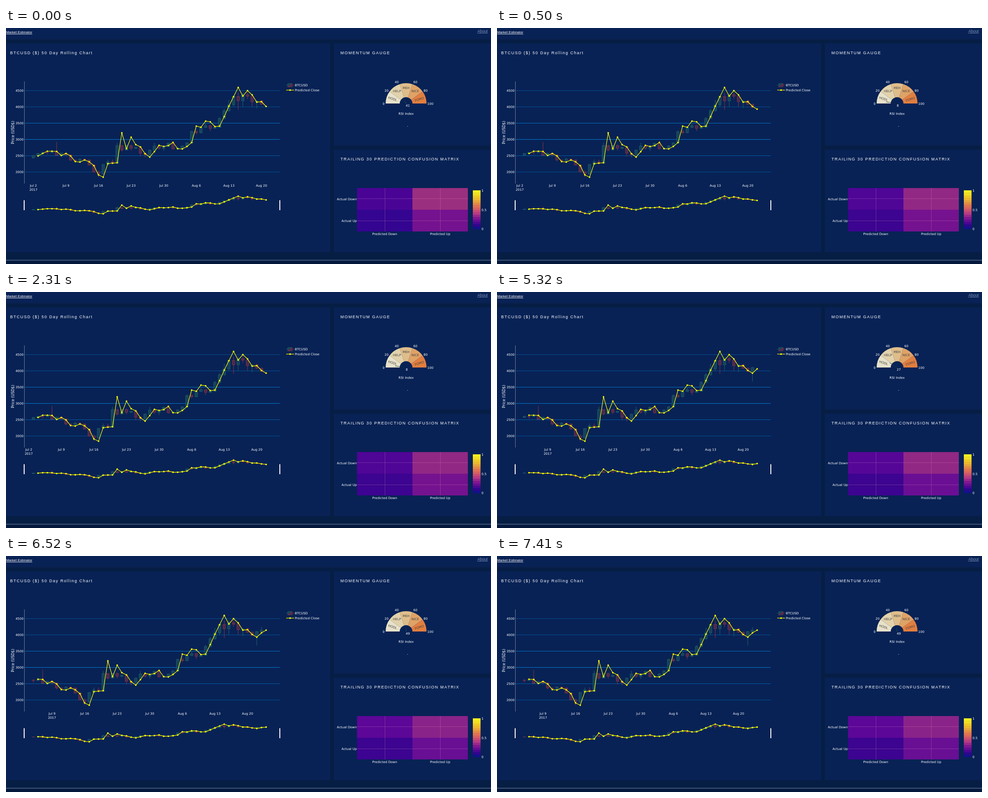
Recreate the animation shown at these times as an HTML page with a canvas. Size 1068 by 522 pixels, loop 8 s.

```html
<!DOCTYPE html>
<html lang="en">
<head>
<meta charset="utf-8">
<title>Rolling price dashboard</title>
<style>
html, body { margin: 0; width: 100%; height: 100%; overflow: hidden; background: #061e44; }
canvas { display: block; }
</style>
</head>
<body>
<canvas id="stage" width="1068" height="522"></canvas>
<script>
const ctx = document.getElementById('stage').getContext('2d');
const LOOP = 8000;
const SANS = '"Liberation Sans", Arial, sans-serif';
const PLOT = '"DejaVu Sans", Verdana, sans-serif';
const PANEL = '#082255';
const FIRST_X = 60.3, DAY = 10.25;

// One entry per step of the rolling window
const STEPS = [
  { at: 0, rsi: 41, matrix: ['#4a0495', '#9b2f7f', '#340590', '#75128f'] },
  { at: 500, rsi: 8, matrix: ['#4f0596', '#912884', '#3c0490', '#75128f'] },
  { at: 3520, rsi: 27, matrix: ['#560697', '#912884', '#3c0490', '#6a0f94'] },
  { at: 6520, rsi: 49, matrix: ['#5c0797', '#8a2389', '#3c0490', '#680f94'] }
];

// Heights on the chart, one per day; predictions begin on the second day
const predicted = [
  283, 277.5, 272.5, 272.5, 273, 282, 277.5, 283, 295.5, 296.5, 292, 296, 304.5,
  325, 330, 300, 299, 298, 232, 267, 241.5, 258, 263, 278, 285.5, 273.5, 259.5,
  262, 260, 253, 267, 267.5, 262, 253.5, 217, 219.5, 206, 207.5, 218, 217, 196,
  173, 152, 131.5, 150.5, 138.5, 148, 164, 163, 173.5, 179.5, 170, 164
];
const closes = [
  282, 277.5, 275, 275.5, 273, 281.5, 277, 281, 292, 294, 290, 292, 303, 318.5,
  323, 302, 296, 299, 260, 270, 260, 266, 264, 277, 280, 270, 261, 266, 262, 255,
  267, 265.5, 261, 254, 229, 231.5, 220, 216, 222, 219.5, 200, 183, 170, 151.5,
  161, 147.5, 151, 163, 161, 168.5, 175.5, 167, 164
];
const highs = {
  0: 281, 3: 272, 5: 252, 10: 288, 14: 315, 16: 291, 17: 291, 18: 254, 21: 258,
  26: 254, 34: 227, 35: 225, 37: 212, 40: 197, 41: 179, 42: 159, 44: 143, 45: 143,
  46: 142, 47: 148, 51: 166, 52: 157
};
const lows = {
  0: 289, 3: 280, 8: 294.5, 9: 297, 14: 330, 17: 301, 19: 273, 21: 271, 22: 268,
  23: 284, 24: 286, 27: 269, 28: 272, 30: 269, 35: 235, 36: 233, 38: 228,
  41: 202, 42: 185, 43: 175, 44: 181, 45: 174, 46: 157, 47: 174, 48: 177.5,
  49: 170, 51: 198, 52: 172
};

const UP = { line: '#225d62', fill: '#15405c' };
const DOWN = { line: '#833145', fill: '#462a4d' };
const mainY = y => y;
const miniY = y => 372 + (y - 131.5) * 0.1965;

function rect(x, y, w, h, color) {
  ctx.fillStyle = color;
  ctx.fillRect(x, y, w, h);
}

function polyline(points, color, width) {
  ctx.beginPath();
  points.forEach(([x, y]) => ctx.lineTo(x, y));
  ctx.strokeStyle = color;
  ctx.lineWidth = width;
  ctx.stroke();
}

function dot(x, y, r, color) {
  ctx.beginPath();
  ctx.arc(x, y, r, 0, Math.PI * 2);
  ctx.fillStyle = color;
  ctx.fill();
}

function text(str, x, y, { size = 7, align = 'left', color = '#fff', font = PLOT, spacing = 0, turn = 0 } = {}) {
  ctx.save();
  ctx.translate(x, y);
  ctx.rotate(turn);
  ctx.font = `${size}px ${font}`;
  ctx.letterSpacing = `${spacing}px`;
  ctx.textAlign = align;
  ctx.textBaseline = 'alphabetic';
  ctx.fillStyle = color;
  ctx.fillText(str, 0, 0);
  const width = ctx.measureText(str).width;
  ctx.restore();
  return width;
}

function link(str, x, y, size, color) {
  const width = text(str, x, y, { size, color, font: SANS });
  rect(x, y + 1, width, 0.8, color);
}

function heading(str, x, y) {
  text(str, x, y, { size: 9, font: SANS, spacing: 1.48 });
}

function drawPage() {
  rect(0, 0, 1068, 522, '#061e44');
  rect(0, 0, 1068, 25, PANEL);
  for (const [x, y, w, h] of [[0, 34, 714, 462], [722, 34, 346, 226], [722, 269, 346, 227]]) {
    rect(x, y, w, h, PANEL);
  }
  rect(0, 513, 1068, 1, '#7384a0');
  rect(0, 518, 1068, 4, '#04173a');
  link('Market Estimator', 0.5, 12, 7.6, '#fff');
  link('About', 1038, 10, 8.7, '#8094bd');
  heading('BTCUSD ($) 50 Day Rolling Chart', 9, 57.5);
  heading('MOMENTUM GAUGE', 736.5, 57.5);
  heading('TRAILING 30 PREDICTION CONFUSION MATRIX', 736.5, 292.5);
}

function drawAxes(shift) {
  const strength = [0.5, 0.55, 0.9, 1, 0.7, 0.55];
  strength.forEach((alpha, i) => {
    const y = 138.7 + i * 35.92;
    ctx.globalAlpha = alpha;
    rect(41, Math.round(y - 0.5), 562, 1, '#007ace');
    ctx.globalAlpha = 1;
    text(String(4500 - i * 500), 38.7, y + 2.6, { align: 'right' });
  });
  rect(40, 118, 1, 226, '#6d7f9d');
  text('Price (USD$)', 18, 231, { size: 8.17, align: 'center', turn: -Math.PI / 2 });

  let yearShown = false;
  for (let day = 0; day <= 49; day += 7) {
    const x = FIRST_X + (day - shift) * DAY;
    if (x < 41) continue;
    const date = day + 2;
    text(date > 31 ? `Aug ${date - 31}` : `Jul ${date}`, x, 351, { align: 'center' });
    if (!yearShown) text('2017', x, 360, { align: 'center' });
    yearShown = true;
  }
}

function drawCandle(day, x, toY) {
  const open = day ? closes[day - 1] : 287;
  const close = closes[day];
  const { line, fill } = close <= open ? UP : DOWN;
  const top = Math.min(open, close), bottom = Math.max(open, close);
  const high = highs[day] ?? top - 1, low = lows[day] ?? bottom + 1;
  polyline([[x, toY(high)], [x, toY(low)]], line, 1.1);
  const y = toY(top), h = toY(bottom) - y;
  rect(x - 2.8, y, 5.6, h, fill);
  ctx.strokeStyle = line;
  ctx.lineWidth = 1;
  ctx.strokeRect(x - 2.8, y, 5.6, h);
}

function drawSeries(shift, toY) {
  for (let i = 0; i < 50; i++) drawCandle(i + shift, FIRST_X + i * DAY, toY);
  const points = predicted.slice(shift, shift + 50)
    .map((y, i) => [FIRST_X + (i + 1) * DAY, toY(y)]);
  polyline(points, '#ff0', 1.2);
  points.forEach(([x, y]) => dot(x, y, 1.8, '#ff0'));
}

function triangle(points, { line, fill }) {
  ctx.beginPath();
  points.forEach(([x, y]) => ctx.lineTo(x, y));
  ctx.closePath();
  ctx.fillStyle = fill;
  ctx.fill();
  ctx.strokeStyle = line;
  ctx.lineWidth = 1;
  ctx.stroke();
}

function drawLegend() {
  polyline([[617, 126.5], [620, 126.5]], UP.line, 1);
  polyline([[630, 126.5], [634, 126.5]], DOWN.line, 1);
  triangle([[620.5, 130], [620.5, 123], [630, 123]], UP);
  triangle([[630, 123], [630, 130], [620.5, 130]], DOWN);
  text('BTCUSD', 636, 129.2);
  polyline([[617, 137.4], [634, 137.4]], '#ff0', 1.2);
  dot(625.5, 137.4, 1.8, '#ff0');
  text('Predicted Close', 636, 140.1);
}

function drawGauge(rsi) {
  const cx = 881, cy = 167;
  const colors = ['#e8e2ca', '#e2d2ac', '#dfbd8b', '#dfa267', '#e27e40'];
  colors.forEach((color, i) => {
    const from = Math.PI * (1 + i / 5), to = Math.PI * (1 + (i + 1) / 5);
    ctx.beginPath();
    ctx.arc(cx, cy, 45, from, to);
    ctx.arc(cx, cy, 14, to, from, true);
    ctx.fillStyle = color;
    ctx.fill();
  });
  const names = [
    ['HODL', 850.5, 159, 0.31], ['HELP', 861, 142, 0], ['MEH', 881, 135, 0],
    ['NICE', 901, 142, 0], ['FOMO', 911, 160, -0.31]
  ];
  names.forEach(([name, x, y, turn]) => text(name, x, y, { align: 'center', color: '#444', turn }));
  const marks = [[831.5, 169.5], [838, 141], [860.5, 122], [901.5, 122], [924, 141], [934.5, 169.5]];
  marks.forEach(([x, y], i) => text(String(i * 20), x, y, { align: 'center' }));

  const angle = Math.PI * rsi / 100;
  const tip = [cx - 25 * Math.cos(angle), cy - 14 * Math.sin(angle)];
  ctx.beginPath();
  ctx.moveTo(cx - 0.8, cy);
  ctx.lineTo(...tip);
  ctx.lineTo(cx + 0.8, cy);
  ctx.closePath();
  ctx.fillStyle = 'rgba(44, 160, 101, .5)';
  ctx.fill();
  ctx.strokeStyle = 'rgba(18, 34, 64, .8)';
  ctx.lineWidth = 0.6;
  ctx.stroke();

  text(String(rsi), 880.2, 174);
  text('RSI Index', cx, 192, { size: 7.1, align: 'center' });
  rect(884, 217, 1, 1, '#fff');
}

function drawMatrix(colors) {
  colors.forEach((color, i) => rect(773 + (i % 2) * 122, 354 + (i >> 1) * 48, 122, 48, color));
  const grid = 'rgba(220, 150, 190, .28)';
  for (const x of [834, 956]) rect(x, 354, 1, 96, grid);
  for (const y of [377, 426]) rect(773, y, 244, 1, grid);
  text('Actual Down', 772.5, 380.5, { align: 'right' });
  text('Actual Up', 772.5, 429, { align: 'right' });
  text('Predicted Down', 834, 457.7, { align: 'center' });
  text('Predicted Up', 956, 457.7, { align: 'center' });

  const bands = [
    '#f3f01f', '#f0df22', '#edcb24', '#ebb92c', '#e7a33a', '#e28b45', '#e07350', '#d66261',
    '#cb4c72', '#b73c82', '#9d288b', '#801791', '#660d93', '#4a0791', '#2d078d', '#12118a'
  ];
  const step = 86 / bands.length;
  bands.forEach((color, i) => {
    const top = Math.round(359 + i * step);
    rect(1028, top, 17, Math.round(359 + (i + 1) * step) - top, color);
  });
  text('1', 1047, 361.7);
  text('0.5', 1047, 404.5);
  text('0', 1047, 447.3);
}

function draw(time) {
  const shift = STEPS.filter(step => step.at <= time).length - 1;
  const { rsi, matrix } = STEPS[shift];
  drawPage();
  drawAxes(shift);
  drawSeries(shift, mainY);
  drawSeries(shift, miniY);
  for (const x of [39, 602]) rect(x, 381, 2, 22, '#fff');
  drawLegend();
  drawGauge(rsi);
  drawMatrix(matrix);
}

const start = performance.now();
function tick() {
  draw((performance.now() - start) % LOOP);
  requestAnimationFrame(tick);
}
tick();
</script>
</body>
</html>
```
